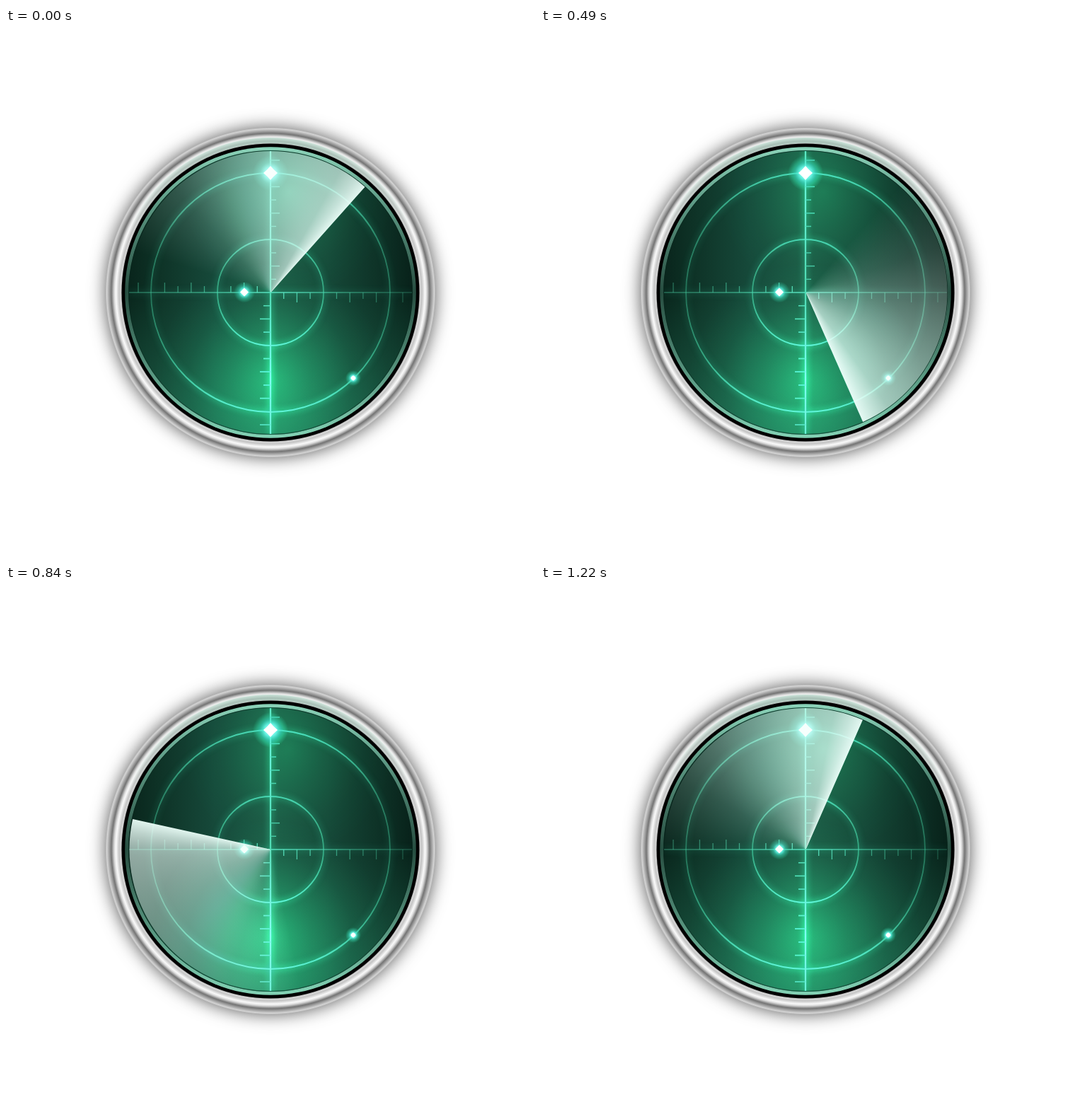
An HTML page with a canvas for the animation above (1.29 s loop, 748 by 748 pixels).

```html
<!DOCTYPE html>
<html lang="en">
<head>
<meta charset="utf-8">
<title>Radar</title>
<style>
  html, body { margin: 0; width: 100%; height: 100%; overflow: hidden; background: #fff; }
  canvas { display: block; width: 748px; height: 748px; }
</style>
</head>
<body>
<canvas id="stage" width="748" height="748"></canvas>
<script>
const SIZE = 748, C = 374, FACE = 200, UNIT = 18.7, LOOP = 1290, TAU = Math.PI * 2;
const rad = deg => deg * Math.PI / 180;
const ctx = document.getElementById('stage').getContext('2d');

// Start time in ms and heading in degrees clockwise from the top.
const STEPS = [
  [0, 41.7], [70, 59.7], [140, 77.6], [350, 102.4], [420, 129], [490, 156.2],
  [560, 180], [630, 207], [700, 236], [770, 259], [840, 282.4],
  [940, 300.3], [1010, 318.3], [1080, 336.2], [1150, 360], [1220, 383.7]
];
// Degrees behind the leading edge and opacity.
const TAIL = [[115, 0], [85, .14], [60, .32], [30, .5], [12, .62], [5, .8], [0, .95]];

function withStops(gradient, stops) {
  stops.forEach(([at, color]) => gradient.addColorStop(at, color));
  return gradient;
}
const linear = (g, x0, y0, x1, y1, stops) => withStops(g.createLinearGradient(x0, y0, x1, y1), stops);
const radial = (g, x, y, r0, r1, stops) => withStops(g.createRadialGradient(x, y, r0, x, y, r1), stops);

function disc(g, r, fill, x = C, y = C) {
  g.fillStyle = fill;
  g.beginPath();
  g.arc(x, y, r, 0, TAU);
  g.fill();
}

function ring(g, r, width, stroke) {
  g.strokeStyle = stroke;
  g.lineWidth = width;
  g.beginPath();
  g.arc(C, C, r, 0, TAU);
  g.stroke();
}

function layer(draw) {
  const canvas = document.createElement('canvas');
  canvas.width = canvas.height = SIZE;
  draw(canvas.getContext('2d'));
  return canvas;
}

function drawBezel(g) {
  g.save();
  g.shadowColor = 'rgba(0,0,0,.75)';
  g.shadowBlur = 26;
  disc(g, 231, '#777');
  g.restore();
  const at = r => (r - 205) / 28.5;
  disc(g, 233.5, radial(g, C, C, 205, 233.5, [
    [0, '#999'], [at(210.5), '#b0b0b0'], [at(212), '#d8d8d8'], [at(214), '#c4c4c4'],
    [at(218.5), '#fafafa'], [at(221), '#dadada'], [at(225), '#747474'],
    [at(228.5), '#a8a8a8'], [at(231.5), '#d4d4d4'], [1, '#adadad']
  ]));
  ring(g, 215, 8, linear(g, 0, 155, 0, 290, [
    [0, 'rgba(125,185,160,.42)'], [1, 'rgba(125,185,160,0)']
  ]));
  disc(g, 210.5, '#000');
  disc(g, 205.8, linear(g, 0, 170, 0, 578, [
    [0, '#8bd2b8'], [.2, '#5c9883'], [.5, '#274d40'], [.8, '#5c9c85'], [1, '#83d1b4']
  ]));
}

const back = layer(g => {
  drawBezel(g);
  disc(g, 201, linear(g, 174, 0, 574, 0, [
    [0, '#09251c'], [.1, '#0e3226'], [.3, '#16493a'], [.5, '#1c5844'],
    [.7, '#164838'], [.9, '#0d3025'], [1, '#08221a']
  ]));
  disc(g, 201, linear(g, 0, 374, 0, 574, [
    [0, 'rgba(40,140,104,0)'], [1, 'rgba(40,140,104,.45)']
  ]));
  ring(g, 200.5, 1, 'rgba(8,38,28,.5)');
});

function drawGrid(g) {
  const across = linear(g, 174, 0, 574, 0, [
    [0, 'rgba(70,190,150,.45)'], [.25, 'rgba(76,212,170,.6)'], [.5, 'rgba(92,235,196,.9)'],
    [.75, 'rgba(76,212,170,.55)'], [1, 'rgba(70,190,150,.28)']
  ]);
  const down = linear(g, 0, 174, 0, 574, [
    [0, '#55dfb7'], [.2, '#5de8c9'], [.5, '#4cd6ac'], [.8, '#62f2db'], [1, '#5ce8c8']
  ]);
  const ringPaint = (r, side) => linear(g, 0, C - r, 0, C + r, [
    [0, 'rgba(76,220,180,.85)'], [.25, `rgba(70,205,160,${side + .08})`],
    [.5, `rgba(64,195,150,${side})`], [.75, `rgba(72,215,168,${side + .15})`],
    [1, 'rgba(84,240,195,.95)']
  ]);
  const line = (x0, y0, x1, y1, width, paint) => {
    g.strokeStyle = paint;
    g.lineWidth = width;
    g.beginPath();
    g.moveTo(x0, y0);
    g.lineTo(x1, y1);
    g.stroke();
  };
  g.save();
  g.shadowColor = 'rgba(60,235,185,.9)';
  g.shadowBlur = 10;
  ring(g, 75, 1.8, ringPaint(75, .65));
  ring(g, 169, 1.8, ringPaint(169, .42));
  line(174, C, 574, C, 1.6, across);
  line(C, 174, C, 574, 2.2, down);
  g.restore();
  for (let k = 1; k <= 10; k++) {
    if (k === 4 || k === 9) continue;
    const length = k % 2 ? 9 : 14, d = k * UNIT;
    line(C, C - d, C + length - 1, C - d, 1.4, '#45c39f');
    line(C, C + d, C - length - 1, C + d, 1.5, '#4cd6ac');
    line(C + d, C, C + d, C + length, 1.3, across);
    line(C - d, C, C - d, C - length, 1.3, across);
  }
}

function drawBlip(g, x, y, size, halo, curve) {
  disc(g, halo, radial(g, x, y, 0, halo, [
    [0, 'rgba(170,255,248,1)'], [.35, 'rgba(98,248,230,.9)'],
    [.6, 'rgba(62,226,196,.42)'], [1, 'rgba(50,210,170,0)']
  ]), x, y);
  g.fillStyle = '#fff';
  g.beginPath();
  for (let i = 0; i <= 4; i++) {
    const a = i * TAU / 4, m = a - TAU / 8;
    const px = x + size * Math.cos(a), py = y + size * Math.sin(a);
    if (i) g.quadraticCurveTo(x + curve * size * Math.cos(m), y + curve * size * Math.sin(m), px, py);
    else g.moveTo(px, py);
  }
  g.fill();
}

const front = layer(g => {
  drawGrid(g);
  drawBlip(g, C, 205, 10, 25, .65);
  drawBlip(g, 337, 373.5, 6, 15, .75);
  drawBlip(g, 491, 495, 3.7, 11, 1);
});

function drawSweep(heading) {
  const span = TAIL[0][0], lead = rad(heading - 90), start = lead - rad(span);
  const tone = alpha => `rgba(236,255,249,${alpha})`;
  const paint = ctx.createConicGradient(start, C + .5, C);
  TAIL.forEach(([behind, alpha]) => paint.addColorStop((span - behind) / 360, tone(alpha)));
  paint.addColorStop((span + 3) / 360, tone(.95));
  paint.addColorStop((span + 4) / 360, tone(0));
  paint.addColorStop(1, tone(0));
  ctx.fillStyle = paint;
  ctx.beginPath();
  ctx.moveTo(C + .5, C);
  ctx.arc(C + .5, C, FACE, start, lead);
  ctx.fill();
}

// Overlaid light brightens the dark face and tints the sweep where it passes.
function drawGlows() {
  const glow = (x, y, r, rgb, alpha) => disc(ctx, FACE, radial(ctx, x, y, 0, r, [
    [0, `rgba(${rgb},${alpha})`], [.35, `rgba(${rgb},${alpha * .55})`],
    [.7, `rgba(${rgb},${alpha * .17})`], [1, `rgba(${rgb},0)`]
  ]));
  ctx.save();
  ctx.globalCompositeOperation = 'overlay';
  glow(C, 497, 165, '175,255,220', .85);
  glow(400, 232, 150, '165,255,215', .5);
  ctx.restore();
}

function render(heading) {
  ctx.fillStyle = '#fff';
  ctx.fillRect(0, 0, SIZE, SIZE);
  ctx.drawImage(back, 0, 0);
  ctx.drawImage(front, 0, 0);
  drawSweep(heading);
  drawGlows();
}

let shown;
const origin = performance.now();
function tick() {
  const t = (performance.now() - origin) % LOOP;
  const heading = STEPS.filter(([start]) => start <= t).pop()[1];
  if (heading !== shown) render(shown = heading);
  requestAnimationFrame(tick);
}
tick();
</script>
</body>
</html>
```
